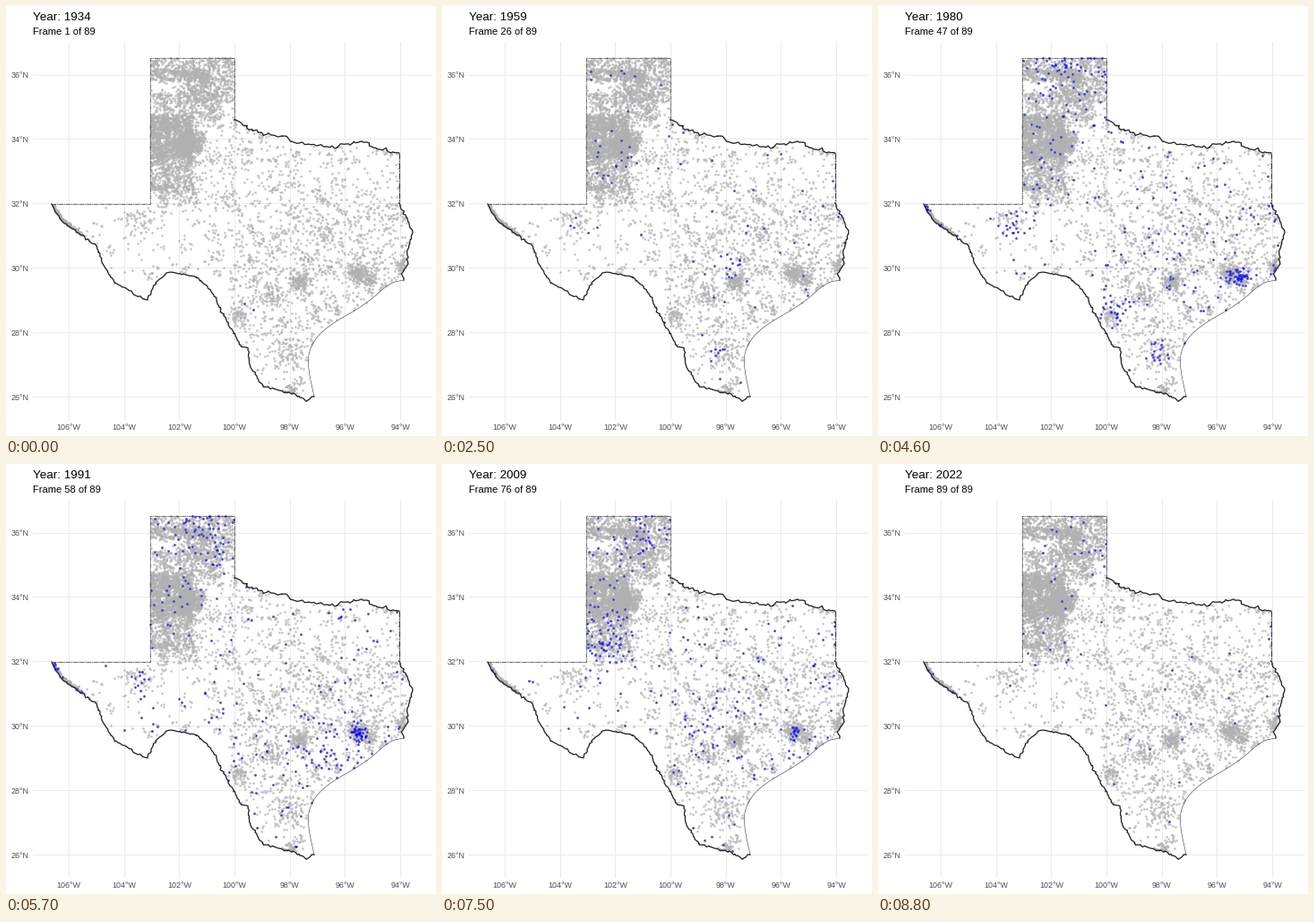
A matplotlib script for the animation above (8900 ms loop, 480 by 480 pixels).

```python
import numpy as np
import matplotlib.pyplot as plt
from matplotlib.animation import FuncAnimation
from matplotlib.path import Path

SIZE, DPI = 480, 100
FRAMES, START = 89, 1934
PX = 72 / DPI
plt.rcParams["font.family"] = "Liberation Sans"

# Corners of the state border in stage pixels
RIO = [(51, 221), (56, 231), (63, 240), (76, 250), (101, 268), (109, 290),
       (122, 309), (157, 329), (168, 308), (182, 297), (210, 301), (228, 316),
       (242, 343), (261, 378), (270, 382), (272, 400), (286, 424), (324, 434),
       (335, 441), (344, 436)]
COAST = [(344, 436), (337, 404), (338, 383), (354, 360), (402, 333),
         (428, 309), (444, 306)]
EAST = [(444, 306), (442, 298), (448, 290), (447, 278), (454, 255), (450, 243),
        (438.5, 220)]
RED = [(254.5, 127), (280, 142), (313, 146), (318, 152), (337, 155),
       (368, 158), (385, 153), (401, 151), (412, 159), (438.5, 164)]
NORTH = [(51, 220.5), (161, 220.5), (161, 58), (254.5, 58), (254.5, 127)]

# Evenly covered areas: x0, y0, x1, y1, wells
ZONES = [(161, 58, 254, 83, 560), (163, 72, 225, 83, 200),
         (200, 82, 254, 107, 400), (161, 95, 215, 122, 250),
         (161, 122, 208, 170, 1500), (161, 168, 208, 205, 520),
         (170, 200, 212, 222, 130), (205, 107, 256, 222, 260),
         (256, 130, 440, 220, 500), (256, 220, 452, 300, 740),
         (250, 290, 440, 360, 500), (265, 355, 345, 436, 150),
         (161, 220, 256, 305, 150), (90, 221, 161, 300, 55)]

# Dense spots: x, y, spread, wells
SPOTS = [(393, 298, 6, 200), (406, 306, 4, 70), (328, 309, 5, 150),
         (297, 323, 8, 90), (258, 345, 5, 60), (316, 385, 10, 80),
         (316, 432, 5, 70), (441, 288, 4, 40), (206, 150, 8, 400),
         (230, 117, 6, 80), (150, 240, 9, 50), (358, 256, 6, 50)]

# Drilling booms: x, y, spread, peak year, years of decay, wells at the peak
BOOMS = [(261, 342, 6, 1934, 4, 2), (406, 314, 2, 1951, 5, 14),
         (321, 288, 7, 1962, 12, 20), (190, 175, 18, 1967, 6, 65),
         (262, 135, 9, 1967, 5, 28), (280, 316, 14, 1967, 5, 35),
         (350, 244, 4, 1967, 5, 14), (310, 385, 6, 1972, 12, 26),
         (152, 246, 8, 1978, 13, 30), (207, 62, 24, 1980, 6, 45),
         (403, 303, 5, 1980, 5, 55), (265, 338, 11, 1980, 8, 32),
         (56, 226, 3, 1987, 6, 12), (355, 318, 18, 1991, 8, 55),
         (394, 299, 5, 1996, 13, 52), (220, 84, 20, 1998, 14, 70),
         (185, 195, 16, 2009, 7, 60), (290, 290, 20, 2009, 6, 30)]


def rough(pts, step=2.2, amp=0.7):
    """Cut a line into short steps and shake it like a river."""
    pts = np.array(pts, float)
    at = np.r_[0, np.hypot(*np.diff(pts, axis=0).T).cumsum()]
    s = np.linspace(0, at[-1], int(at[-1] / step))
    line = np.column_stack([np.interp(s, at, pts[:, k]) for k in (0, 1)])
    line[1:-1] += rng.normal(0, amp, (len(s) - 2, 2))
    return line


def smooth(pts, rounds=3):
    pts = np.array(pts, float)
    for _ in range(rounds):
        a, b = pts[:-1], pts[1:]
        mid = np.stack([0.75 * a + 0.25 * b, 0.25 * a + 0.75 * b], 1)
        pts = np.vstack([pts[:1], mid.reshape(-1, 2), pts[-1:]])
    return pts


def fill_zone(x0, y0, x1, y1, n):
    """Half the wells lie evenly, half in small clumps."""
    even = rng.uniform((x0, y0), (x1, y1), (n // 2, 2))
    heads = rng.uniform((x0, y0), (x1, y1), (n // 8 + 1, 2))
    clumps = heads[rng.integers(len(heads), size=n // 2)]
    return np.vstack([even, clumps + rng.normal(0, 3, clumps.shape)])


def river_wells(n=190):
    """Wells that follow the upper Rio Grande, thinning downstream."""
    x = 53 + 34 * rng.random(n) ** 1.8
    y = np.interp(x, *np.array(RIO[:5]).T) - 1.5
    return np.column_stack([x, y]) + rng.normal(0, 1, (n, 2))


def rarity(pts, cell=14):
    """Weight of each well, low where wells are crowded."""
    _, cells, count = np.unique((pts // cell) @ [1, 1000],
                                return_inverse=True, return_counts=True)
    return count[cells] ** -0.7


def snap(pts):
    """Indices of the known wells nearest to the points."""
    return ((pts[:, None] - wells[None]) ** 2).sum(-1).argmin(1)


def active(year):
    """Wells of one year: a thin scatter plus the booms of the time."""
    rng = np.random.default_rng(year)
    n = int(np.interp(year, [1934, 1951, 1967, 1980, 2009, 2022],
                      [0, 14, 90, 190, 180, 53]))
    picks = [rng.choice(len(wells), n, replace=False, p=odds)]
    for x, y, s, peak, span, top in BOOMS:
        k = round(top * np.exp(-((year - peak) / span) ** 2))
        if k:
            picks.append(snap(rng.normal((x, y), s, (k, 2))))
    return wells[np.unique(np.concatenate(picks))]


rng = np.random.default_rng(7)
rio, east = rough(RIO), rough(EAST)
red = rough(RED, 2.5, 1)
coast = smooth(COAST)
state = Path(np.vstack([NORTH, red, east[::-1], coast[::-1], rio[::-1]]))

parts = [fill_zone(*z) for z in ZONES]
parts += [rng.normal((x, y), s, (n, 2)) for x, y, s, n in SPOTS]
wells = np.vstack(parts + [river_wells()])
wells = wells[state.contains_points(wells)]
odds = rarity(wells)
odds /= odds.sum()
by_year = [active(START + i) for i in range(FRAMES)]

fig = plt.figure(figsize=(SIZE / DPI, SIZE / DPI), dpi=DPI, facecolor="white")
ax = fig.add_axes([0, 0, 1, 1])
ax.set(xlim=(0, SIZE), ylim=(SIZE, 0))
ax.axis("off")


def label(x, y, text, px, color="black", ha="left"):
    return ax.text(x, y, text, size=px * PX, color=color, ha=ha, va="baseline")


def stroke(pts, px, color, z=3, **kw):
    ax.plot(*np.array(pts, float).T, lw=px * PX, color=color, zorder=z, **kw)


def dots(color, alpha, z):
    return ax.plot([], [], "o", ms=2.6 * PX, mew=0, color=color,
                   alpha=alpha, zorder=z)[0]


for k in range(7):
    x = 70 + 61.67 * k
    stroke([(x, 40), (x, 461)], 1.07, "#ebebeb", 1)
    label(x, 473, f"{106 - 2 * k}°W", 8.9, "#4d4d4d", "center")
for k in range(6):
    y = 76.5 + 71.95 * k
    stroke([(30, y), (475, y)], 1.07, "#ebebeb", 1)
    label(25.3, y + 3.3, f"{36 - 2 * k}°N", 8.9, "#4d4d4d", "right")

dots("#b0b0b0", 0.75, 2).set_data(*wells.T)

dashed = dict(linestyle=(0, (7, 1, 2, 1)), dash_capstyle="butt")
stroke(NORTH, 0.7, "#333333", **dashed)
stroke([RED[-1], EAST[-1]], 1, "#333333", **dashed)
stroke(coast, 0.6, "#444444")
for bank in (rio, red, east):
    stroke(bank, 1.3, "#222222")

blue = dots("blue", 0.7, 4)
title = label(30, 16, "", 13.4)
sub = label(30, 32, "", 11.1)


def draw(i):
    blue.set_data(*by_year[i].T)
    title.set_text(f"Year: {START + i}")
    sub.set_text(f"Frame {i + 1} of {FRAMES}")
    return blue, title, sub


anim = FuncAnimation(fig, draw, frames=FRAMES, interval=100, repeat=True)
plt.show()
```
